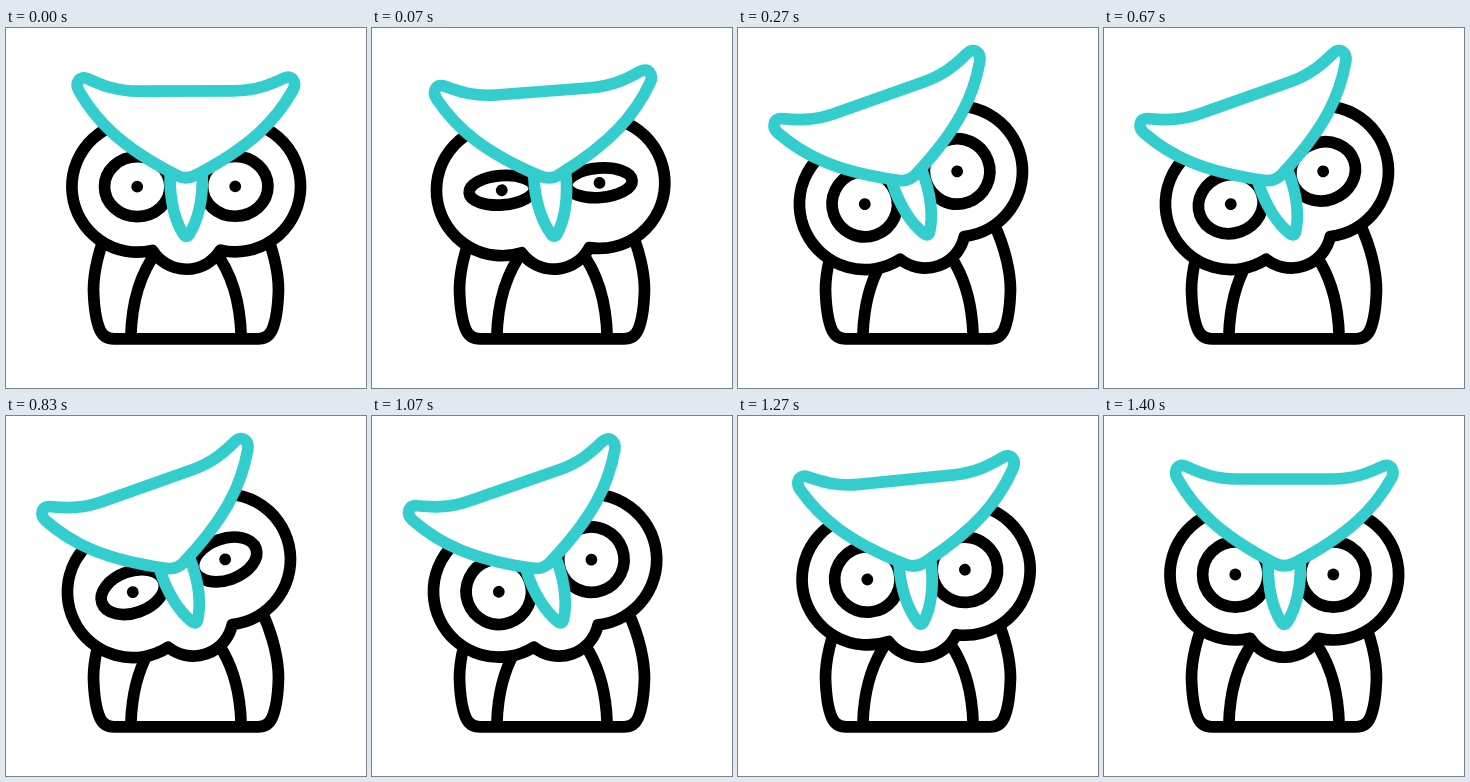
Recreate the animation shown at these times as an HTML page. Size 360 by 360 pixels, loop 1.67 s.

```html
<!DOCTYPE html>
<html lang="en">
<head>
<meta charset="utf-8">
<title>Owl</title>
<style>
  html, body { margin: 0; width: 100%; height: 100%; overflow: hidden; background: #fff; }
  svg { display: block; width: 100%; height: 100%; }
  .line { fill: none; stroke: #000; stroke-width: 11.7; stroke-linecap: round; stroke-linejoin: round; }
  .fill { fill: #fff; }
  .teal { stroke: #34cdcd; }
</style>
</head>
<body>
<svg viewBox="0 0 360 360">
  <g class="line">
    <path d="M152 222C134 245 125.5 275 124.8 310M208 222C226 245 234.5 275 235.2 310"/>
    <path d="M104.5 195C92.5 220 87.5 245 87.5 262C88 280 90 293 94 302Q98 310.8 108 310.8H252Q262 310.8 266 302C270 293 272 280 272.5 262C272.5 245 267.5 220 255.5 195"/>
  </g>
  <g id="head">
    <path class="line fill" d="M146 221.8A65.5 65.5 0 1 1 131 92.5H229A65.5 65.5 0 1 1 214 221.8A40 40 0 0 1 146 221.8Z"/>
    <ellipse class="line fill eye" cx="131" cy="158" rx="32.7" ry="32.7"/>
    <ellipse class="line fill eye" cx="229" cy="158" rx="32.7" ry="32.7"/>
    <circle cx="131" cy="158" r="5.9"/>
    <circle cx="229" cy="158" r="5.9"/>
    <path class="line fill teal" d="M164 146C163 172 169 193 177 205.5Q180 210 183 205.5C191 193 197 172 196 146"/>
    <path class="line fill teal" d="M132 62.5H228C250 62.5 265 56 278 50C286 46 291.5 54 287 62C270 92 245 118 190 146.5Q180 152 170 146.5C115 118 90 92 73 62C68.5 54 74 46 82 50C95 56 110 62.5 132 62.5Z"/>
  </g>
</svg>
<script>
  const LOOP = 1670, FRAMES = 50, STEP = LOOP / FRAMES;
  const TILT = 19.5, EYE = 32.7, SQUINT = 24;
  const head = document.getElementById('head');
  const eyes = document.querySelectorAll('.eye');

  const span = (f, from, to) => Math.min(1, Math.max(0, (f - from) / (to - from)));
  const ease = t => (1 - Math.cos(Math.PI * t)) / 2;
  const blink = t => Math.sin(Math.PI * t) ** 2;

  function draw(ms) {
    // The motion is stepped at about 30 poses per second.
    const f = Math.min(FRAMES - 1, Math.floor((ms % LOOP + 4) / STEP));
    const tilt = TILT * (ease(span(f, -0.5, 7.5)) - ease(span(f, 31, 42)));
    const shut = blink(span(f, -1, 8)) + blink(span(f, 19, 27));
    head.setAttribute('transform', `translate(0.3 0.5) rotate(${-tilt} 180 180)`);
    eyes.forEach(eye => eye.setAttribute('ry', EYE - SQUINT * shut));
  }

  const start = performance.now();
  function tick() {
    draw(performance.now() - start);
    requestAnimationFrame(tick);
  }
  tick();
</script>
</body>
</html>
```
